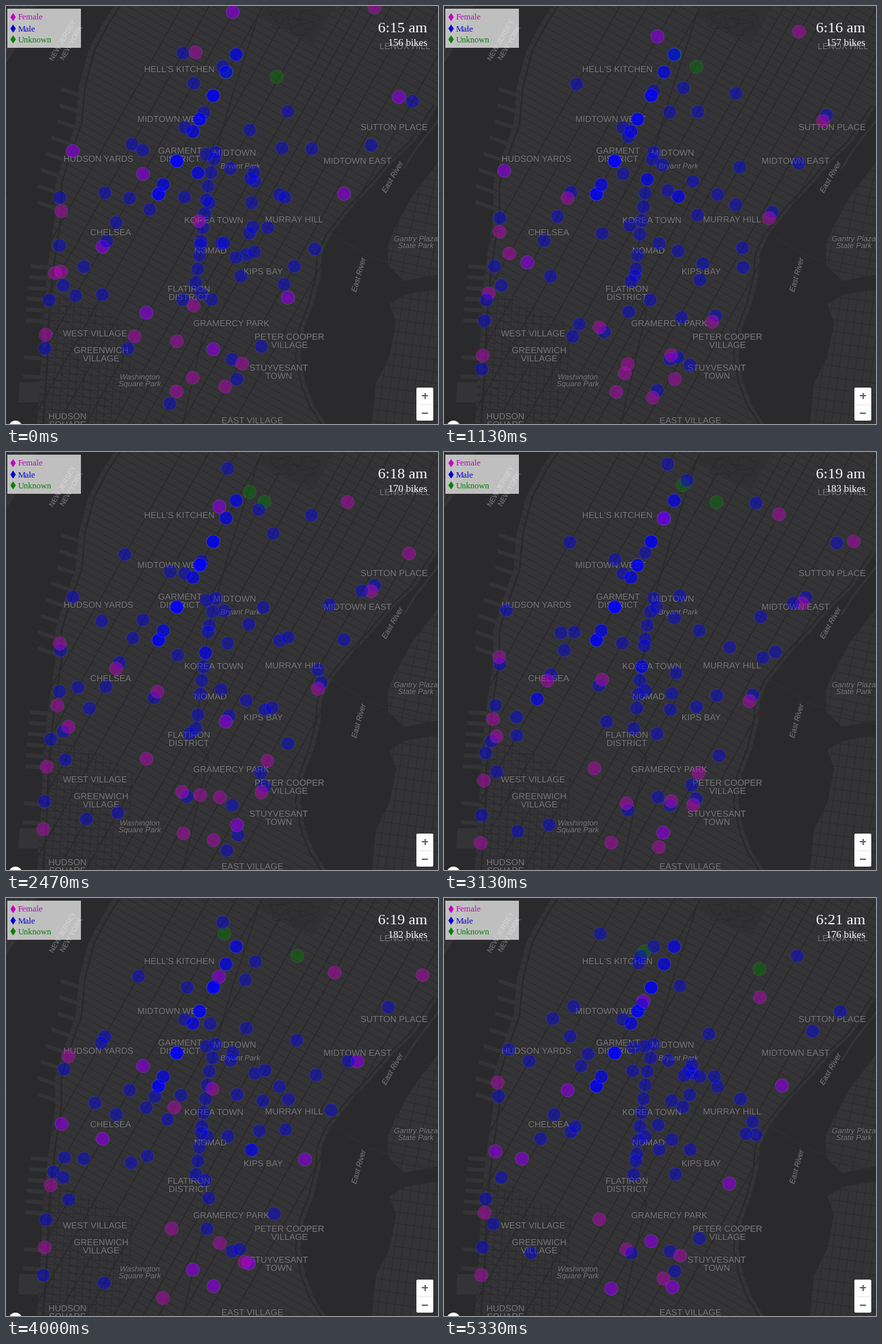
These frames come from a looping animation (640 px wide and 620 px high, 5.39 s). A matplotlib script:

```python
import numpy as np
import matplotlib.pyplot as plt
from matplotlib.animation import FuncAnimation
from matplotlib.collections import LineCollection
from matplotlib.patches import Circle, FancyBboxPatch, Polygon, Rectangle
from matplotlib.patheffects import withStroke

W, H, DPI = 640, 620, 100
FRAMES, LOOP = 81, 5390
PT = 72 / DPI

WATER, LAND, STREET, PARK = "#2a2a2c", "#343436", "#29292b", "#303032"
LABEL, HALO = "#7a7a7c", "#2e2e30"
MALE, FEMALE, UNKNOWN = (0, 0, 1, .42), (.76, 0, .76, .48), (0, .5, 0, .42)

rng = np.random.default_rng(11)
fig = plt.figure(figsize=(W / DPI, H / DPI), dpi=DPI, facecolor=WATER)
ax = fig.add_axes([0, 0, 1, 1])
ax.set(xlim=(0, W), ylim=(H, 0))
ax.axis("off")

# The city grid: distances along and across the avenues from one midtown corner.
TILT = np.radians(29.1)
CROSS = np.array([np.cos(TILT), np.sin(TILT)])
DOWN = np.array([-np.sin(TILT), np.cos(TILT)])
MID = np.array([253, 230])
BLOCK = 10.3
AVENUES = [-105, -70, -34, 0, 36, 72, 108, 127, 146, 166, 196, 228, 262]


# ---------- map ----------
def area(points, color=LAND, z=1):
    return ax.add_patch(Polygon(points, fc=color, ec="none", zorder=z))


def road(points, width=1.2, color=STREET):
    ax.plot(*zip(*points), color=color, lw=width * PT, zorder=3)


def grid(clip, origin, angle, offsets, width=.8):
    """Parallel streets at an angle, spaced by offsets, kept inside clip."""
    a = np.radians(angle)
    run, side = np.array([np.cos(a), np.sin(a)]), np.array([-np.sin(a), np.cos(a)])
    mids = [np.array(origin) + d * side for d in offsets]
    lines = LineCollection([(m - 900 * run, m + 900 * run) for m in mids],
                           colors=STREET, linewidths=width * PT, zorder=2)
    ax.add_collection(lines)
    lines.set_clip_path(clip)


west = [(160, 0), (142, 28), (122, 66), (108, 120), (103, 175), (84, 228), (73, 265),
        (73, 310), (64, 370), (58, 420), (54, 470), (52, 530), (46, 620)]
east = [(474, 620), (456, 592), (444, 560), (436, 520), (441, 480), (456, 440), (466, 400),
        (468, 368), (482, 338), (512, 300), (545, 265), (572, 233), (606, 200), (640, 148)]
manhattan = area(west + east + [(640, 0)])
queens = area([(640, 232), (603, 280), (578, 325), (566, 352), (566, 385), (590, 408), (640, 398)])
brooklyn = area([(640, 420), (592, 428), (568, 442), (578, 470), (568, 520), (548, 560),
                 (542, 620), (640, 620)])
jersey = area([(0, 0), (45, 0), (30, 40), (0, 85)])
village = area([(58, 420), (100, 432), (190, 478), (185, 560), (160, 620), (46, 620), (52, 530)], z=2)

grid(manhattan, MID, 29.1, np.arange(-44, 50) * BLOCK)
grid(manhattan, MID, 119.1, [-d for d in AVENUES], 1.5)
for clip, origin, angle, gap, cross_gap in [
        (queens, (600, 330), 12, 13, 20), (brooklyn, (600, 520), 8, 17, 12),
        (jersey, (20, 40), 120, 9, 24), (village, (75, 500), 4, 11, 11)]:
    grid(clip, origin, angle, np.arange(-12, 13) * gap)
    grid(clip, origin, angle + 90, np.arange(-12, 13) * cross_gap)

area([(388, 0), (373, 12), (455, 56), (487, 0)], PARK, 3)
t = np.linspace(0, 2 * np.pi, 70)
for cx, cy, r in [(415, 22, 18), (436, 30, 17), (405, 16, 11), (447, 17, 14)]:
    wave = r * (1 + .22 * np.sin(3 * t + cx) + .12 * np.cos(5 * t))
    road(list(zip(cx + wave * np.cos(t), cy + .7 * wave * np.sin(t))), .9)

shore_x, shore_y = np.array(west).T
for y in [*range(130, 320, 24), *range(385, 480, 16), 520, 548]:
    x, slope = np.interp(y, shore_y, shore_x), 10 if y < 320 else 2
    area([(x + 4, y), (x - 26, y - slope), (x - 26, y - slope + 6), (x + 4, y + 6)])
area([(20, 558), (52, 558), (50, 588), (18, 588)])

broadway = [(311, 217), (300, 262), (295, 302), (291, 332), (284, 392), (278, 430)]
road([(x + 9, y) for x, y in west], 2.4)
road([(x - 7, y) for x, y in east], 2.2)
road([(375, 10), (363, 48), (336, 130)] + broadway + [(300, 452), (262, 620)], 1.6)
road([(440, 318), (482, 338), (540, 372), (640, 404)], 1.2, PARK)
road([(640, 170), (606, 214), (590, 240)], 3, LAND)


def label(x, y, text, size=13, italic=False, turn=0):
    ax.text(x, y, text, fontsize=size * PT, color=LABEL, family="Liberation Sans",
            style="italic" if italic else "normal", rotation=turn, ha="center",
            va="center", linespacing=1.02, zorder=4, clip_on=True,
            path_effects=[withStroke(linewidth=2 * PT, foreground=HALO)])


for x, y, name in [
        (257, 95, "HELL'S KITCHEN"), (247, 169, "MIDTOWN WEST"), (137, 228, "HUDSON YARDS"),
        (258, 222, "GARMENT\nDISTRICT"), (339, 219, "MIDTOWN"), (521, 231, "MIDTOWN EAST"),
        (575, 181, "SUTTON PLACE"), (591, 61, "LENOX HILL"), (308, 319, "KOREA TOWN"),
        (427, 318, "MURRAY HILL"), (155, 337, "CHELSEA"), (303, 364, "NOMAD"),
        (381, 395, "KIPS BAY"), (271, 427, "FLATIRON\nDISTRICT"), (334, 472, "GRAMERCY PARK"),
        (420, 498, "PETER COOPER\nVILLAGE"), (404, 544, "STUYVESANT\nTOWN"),
        (132, 487, "WEST VILLAGE"), (141, 518, "GREENWICH\nVILLAGE"),
        (91, 616, "HUDSON\nSQUARE"), (365, 616, "EAST VILLAGE")]:
    label(x, y, name)
for x, y, name, turn in [
        (347, 238, "Bryant Park", 0), (198, 556, "Washington\nSquare Park", 0),
        (607, 351, "Gantry Plaza\nState Park", 0), (573, 254, "East River", 60),
        (523, 399, "East River", 74), (-8, 316, "Hudson River", 80)]:
    label(x, y, name, 11.3, True, turn)
label(84, 51, "NEW JERSEY", 10.5, turn=60)
label(97, 55, "NEW YORK", 10.5, turn=60)

# ---------- rides ----------
HOLD = 5  # frames spent at each corner
rides = []


def ride(color, corners, start, end=FRAMES):
    rides.append((color, np.asarray(corners), start, end))


def route(points, men=0, women=0, others=0):
    """Riders spread evenly along a path, hopping one block at a time."""
    points = np.array(points, float)
    far = np.r_[0, np.cumsum(np.hypot(*np.diff(points, axis=0).T))]
    steps = np.arange(0, far[-1], BLOCK)
    corners = np.column_stack([np.interp(steps, far, axis) for axis in points.T])
    for color, count in [(UNKNOWN, others), (MALE, men), (FEMALE, women)]:
        for i in range(count):
            lead = int(i * len(corners) / count)
            ride(color, corners, -lead * HOLD - rng.integers(HOLD))


def trips(color, count, center):
    """Short seeded trips on the grid, densest around the center street."""
    island = manhattan.get_path()
    while count:
        avenue = rng.choice(AVENUES)
        street = round(rng.triangular(-30, center, 37))
        along = rng.random() < .7
        stride = (DOWN * BLOCK if along else CROSS * 18) * rng.choice([-1, 1])
        life = rng.integers(24, 56)
        corner = MID + avenue * CROSS + street * BLOCK * DOWN
        corners = corner + np.outer(np.arange(life // HOLD + 1), stride)
        if island.contains_points(corners[[0, -1]]).all():
            start = rng.integers(-40, FRAMES)
            ride(color, corners, start, start + life)
            count -= 1


route([(401, 105), (357, 81), (363, 48), (311, 54), (291, 90)], others=1)
route([(326, 98), (341, 72), (412, 75), (467, 106), (472, 97)], others=1)

# bikes waiting at the busiest corners, nearly all along one avenue
for x, y, stack in [(253, 230, 4), (307, 133, 3), (287, 168, 3), (277, 186, 2), (226, 279, 3),
                    (233, 265, 2), (341, 72, 2), (326, 98, 2), (265, 180, 1), (335, 524, 1)]:
    for _ in range(stack):
        ride(MALE, [(x, y)], 0)

route([(99, 215), (79, 275), (84, 325), (74, 390), (61, 450), (56, 540), (54, 590)], men=5, women=4)
route(broadway, men=11)
route([(203, 249), (165, 318), (136, 370), (103, 397), (62, 437)], men=6, women=2)
route([(582, 135), (511, 259), (445, 384), (391, 480), (357, 547), (334, 584)], men=6, women=3)
route([(297, 220), (345, 248), (388, 270), (440, 299)], men=4)
route([(288, 354), (326, 352), (364, 373), (391, 386)], men=3)
route([(208, 455), (237, 483), (268, 510), (277, 553), (225, 600)], men=1, women=3)
route([(307, 509), (347, 521), (355, 545), (304, 578), (329, 592)], men=2, women=3)
route([(546, 2), (527, 36), (498, 89), (465, 153)], women=1)
route([(336, 9), (306, 64), (326, 98), (287, 168)], men=2, women=1)
trips(MALE, 105, 0)
trips(FEMALE, 12, 25)

dots = ax.scatter([], [], s=(19.6 * PT) ** 2, linewidths=.6 * PT,
                  edgecolors=[(.7, .7, 1, .17)], zorder=5)

# ---------- panels ----------
ax.add_patch(Rectangle((2, 4), 109, 58, fc=(1, 1, 1, .7), ec="none", zorder=7))
for y, name, color in [(16, "Female", "#c000c0"), (33, "Male", "#0000d0"), (49, "Unknown", "#008000")]:
    ax.plot(10, y, "d", ms=9 * PT, mec="none", color=color, zorder=8)
    ax.text(18, y, name, color=color, fontsize=12.6 * PT, family="Liberation Serif",
            va="center_baseline", zorder=8)

ax.add_patch(FancyBboxPatch((609, 567), 23, 47, boxstyle="round,pad=1,rounding_size=2",
                            fc="white", ec="none", zorder=7))
for points in [((616, 578), (625, 578)), ((620.5, 573.5), (620.5, 582.5)), ((616, 603.5), (625, 603.5))]:
    ax.plot(*zip(*points), color="#666666", lw=2 * PT, solid_capstyle="butt", zorder=8)
ax.plot([612, 629], [590.5, 590.5], color="#e4e4e4", lw=PT, zorder=8)
ax.add_patch(Circle((14, 625), 10, fc="white", ec="none", zorder=7))


def readout(y, size):
    return ax.text(624, y, "", color="white", fontsize=size * PT, family="Liberation Serif",
                   ha="right", va="baseline", zorder=8)


clock, total = readout(39, 22.5), readout(59, 15)


def update(frame):
    live = [r for r in rides if r[2] <= frame < r[3]]
    dots.set_offsets([corners[(frame - start) // HOLD % len(corners)]
                      for _, corners, start, _ in live])
    dots.set_facecolors([r[0] for r in live])
    clock.set_text(f"6:{15 + int(.565 + .0735 * frame)} am")
    bikes = np.interp(frame, [0, 16, 27, 47, 60, 72], [156, 157, 158, 183, 182, 176])
    total.set_text(f"{round(bikes)} bikes")
    return dots, clock, total


anim = FuncAnimation(fig, update, frames=FRAMES, interval=LOOP / FRAMES, repeat=True, repeat_delay=0)
plt.show()
```
